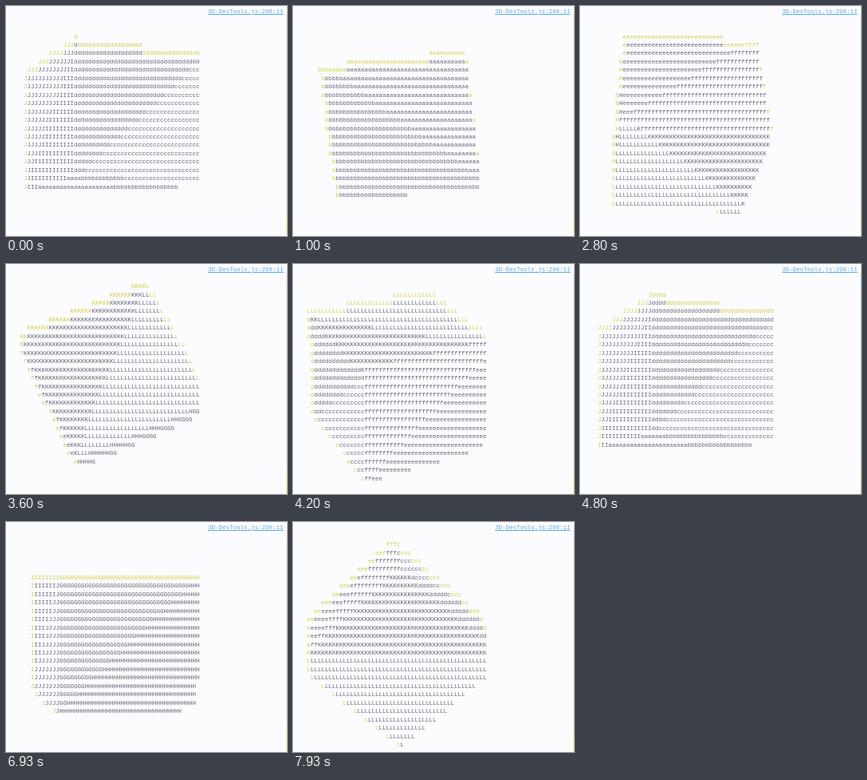
These frames come from a looping animation (352 px wide and 288 px high, 8000 ms). An HTML page:

```html
<!DOCTYPE html>
<html lang="en">
<head>
<meta charset="utf-8">
<title>Console cube</title>
<style>
  html, body { margin: 0; width: 100%; height: 100%; overflow: hidden; background: #fcfcfe; }
  #stage { position: relative; width: 352px; height: 288px; overflow: hidden; }
  #stage, pre { font: 7.5px/10.45px "Liberation Mono", monospace; }
  #screen { position: absolute; left: 17.5px; top: 2.2px; margin: 0; color: #66667a; }
  #screen i { font-style: normal; color: #cfcf4a; }
  #link { position: absolute; left: 253px; top: 2px; color: #5fa8e0; text-decoration: underline; white-space: pre; }
  #edge { position: absolute; right: 0; top: 10px; bottom: 0; width: 1px;
          background: linear-gradient(#e9e9ee 248px, #f3f39a 248px); }
</style>
</head>
<body>
<div id="stage">
  <pre id="screen"></pre>
  <span id="link">3D-DevTools.js:298:11</span>
  <div id="edge"></div>
</div>
<script>
const COLS = 50, ROWS = 27, CELL_W = 4.5, CELL_H = 10.45;
const STEP = 1000 / 15, STEPS = 120;
const CAMERA = 5.5, SCALE_X = 910, SCALE_Y = 819, CENTER_X = 130.5, CENTER_Y = 146.5;
const LEFT = 17.5, FIRST_ROW = 7.45;
const YAW = 3;

// Corners are numbered by bits; each face: its diagonal, then the apex of each half.
const FACES = [
  ['ab', 5, 3, 1, 7], ['cd', 5, 6, 7, 4], ['ef', 7, 2, 3, 6],
  ['GH', 0, 3, 1, 2], ['IJ', 1, 4, 5, 0], ['KL', 2, 4, 6, 0]
];
const screen = document.getElementById('screen');

function turn(a, b, degrees) {
  const angle = degrees * Math.PI / 180, c = Math.cos(angle), s = Math.sin(angle);
  return [a * c - b * s, a * s + b * c];
}

function corner(index, theta) {
  let [x, y, z] = [4, 2, 1].map(bit => (index & bit ? 0.5 : -0.5));
  [x, y] = turn(x, y, theta + 90);
  [z, y] = turn(z, y, theta / 2);
  y = -y;
  [y, z] = [z, y];
  [y, z] = turn(y, z, 90);
  return { x, y, z };
}

function project(theta) {
  const spin = theta + 90, tilt = (theta / 2 + 90) * Math.PI / 180;
  return Array.from({ length: 8 }, (_, i) => {
    const [u, v, w] = [4, 2, 1].map(bit => (i & bit ? 0.5 : -0.5));
    const [side, q] = turn(u, v, spin);
    const y = q * Math.sin(tilt) + w * Math.cos(tilt);
    const depth = w * Math.sin(tilt) - q * Math.cos(tilt);
    const [z, x] = turn(depth, side, YAW);
    const near = 1 / (CAMERA - z);
    return {
      z,
      col: (CENTER_X + SCALE_X * x * near - LEFT) / CELL_W - 0.5,
      row: (CENTER_Y + SCALE_Y * y * near - FIRST_ROW) / CELL_H
    };
  });
}

// Columns the triangle covers anywhere within the height of a text row.
function rowSpan(points, row) {
  const hits = points.filter(p => Math.abs(p.row - row) <= 0.5).map(p => p.col);
  points.forEach((p, i) => {
    const q = points[(i + 1) % 3];
    for (const y of [row - 0.5, row + 0.5]) {
      if ((p.row - y) * (q.row - y) < 0) {
        hits.push(p.col + (q.col - p.col) * (y - p.row) / (q.row - p.row));
      }
    }
  });
  return hits.length ? [Math.min(...hits), Math.max(...hits)] : null;
}

function fill(grid, points, letter) {
  grid.forEach((line, row) => {
    const span = rowSpan(points, row);
    if (!span) return;
    const end = Math.min(COLS - 1, Math.floor(span[1] + 0.2));
    for (let col = Math.max(0, Math.ceil(span[0] - 0.2)); col <= end; col++) line[col] = letter;
  });
}

function toMarkup(grid) {
  return grid.map((line, row) => {
    const first = line.findIndex(ch => ch !== ' ');
    return line.map((ch, col) => {
      const rim = ch !== ' ' && (col === first || !row || grid[row - 1][col] === ' ');
      return rim ? `<i>${ch}</i>` : ch;
    }).join('');
  }).join('\n').replace(/<\/i><i>/g, '');
}

function render(step) {
  const pts = project(-157 + 10.03 * step);
  const grid = Array.from({ length: ROWS }, () => Array(COLS).fill(' '));
  const depth = ([, a, b]) => pts[a].z + pts[b].z;
  for (const [letters, a, b, ...tips] of [...FACES].sort((f, g) => depth(f) - depth(g))) {
    tips.forEach((tip, i) => fill(grid, [pts[a], pts[b], pts[tip]], letters[i]));
  }
  screen.innerHTML = toMarkup(grid);
}

const start = performance.now();
let shown = -1;
function tick() {
  const step = Math.floor((performance.now() - start + 4) / STEP) % STEPS;
  if (step !== shown) render(shown = step);
  requestAnimationFrame(tick);
}
tick();
</script>
</body>
</html>
```
